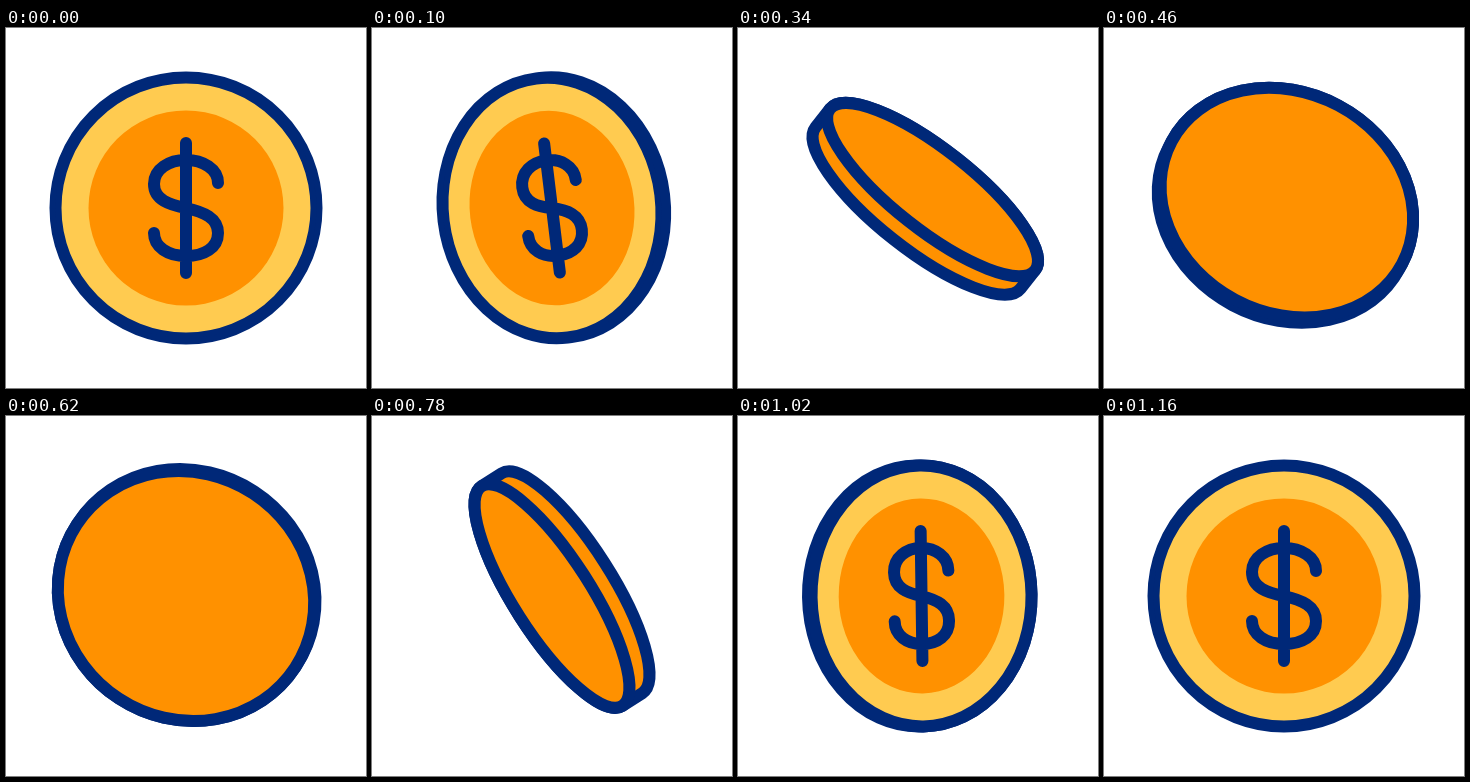
Animation of 360x360 px, one loop 1400 ms. Source, as an HTML page with a canvas:

```html
<!DOCTYPE html>
<html>
<head>
<meta charset="utf-8">
<style>
  html, body { margin: 0; width: 100%; height: 100%; overflow: hidden; background: #fff; }
  canvas { display: block; }
</style>
</head>
<body>
<canvas id="stage" width="360" height="360"></canvas>
<script>
const ctx = document.getElementById('stage').getContext('2d');
const NAVY = '#002878', ORANGE = '#ff9100', YELLOW = '#ffcb50';
const LOOP = 1400, HALF_TURN = 560, RADIUS = 130.5, LINE = 12;
const MAX_TILT = 62 * Math.PI / 180;

// Dollar sign, centred on the coin
const dollar = new Path2D(
  'M0-65V65 M32-25C32-39 17-48 0-48S-32-39-32-24C-32-8-16-3 0 0' +
  'C18 4 32 10 32 25S18 48 0 48S-32 39-32 25');

const ease = (t, start, length) => {
  const x = Math.min(1, Math.max(0, (t - start) / length));
  return (1 - Math.cos(Math.PI * x)) / 2;
};

function paint(path, fill, width) {
  if (fill) {
    ctx.fillStyle = fill;
    ctx.fill(path);
  }
  if (width) {
    ctx.lineWidth = width;
    ctx.stroke(path);
  }
}

function disc(x, rx, ry) {
  const path = new Path2D();
  path.ellipse(x, 0, Math.max(0, rx), ry, 0, 0, 2 * Math.PI);
  return path;
}

function draw(t) {
  const spin = Math.PI * Math.min(t / HALF_TURN, 2);
  const tilt = MAX_TILT * (ease(t, 0, 465) - ease(t, 520, 540));
  const turn = Math.cos(spin), squash = Math.abs(turn);
  // The outer edge is foreshortened, the line keeps its width
  const rx = Math.max(0, (RADIUS + LINE / 2) * squash - LINE / 2);
  const depth = Math.min(24, (32 - 10 * turn) * (1 - squash));
  const nearFace = spin % Math.PI < Math.PI / 2;
  const faceX = nearFace ? 0 : depth;

  ctx.setTransform(1, 0, 0, 1, 0, 0);
  ctx.fillStyle = '#fff';
  ctx.fillRect(0, 0, 360, 360);
  ctx.translate(180, 180);
  ctx.rotate(-tilt);
  ctx.strokeStyle = NAVY;
  ctx.lineCap = ctx.lineJoin = 'round';

  // Silhouette of both faces and the edge between them
  const body = new Path2D();
  body.ellipse(0, 0, rx, RADIUS, 0, Math.PI / 2, 1.5 * Math.PI);
  body.ellipse(depth, 0, rx, RADIUS, 0, -Math.PI / 2, Math.PI / 2);
  body.closePath();
  paint(body, ORANGE, LINE);

  if (turn < 0) {
    paint(disc(faceX, rx, RADIUS), ORANGE, LINE);
    return;
  }

  // The near face has a thinner line towards the edge
  const inset = nearFace ? 3 : 0;
  paint(disc(faceX, rx - inset, RADIUS - inset), YELLOW, LINE - 2 * inset);
  paint(disc(faceX, 97.5 * squash, 97.5), ORANGE);
  const sign = new Path2D();
  sign.addPath(dollar, new DOMMatrix([turn, 0, 0, 1, faceX, 0]));
  paint(sign, null, LINE);
}

const start = performance.now();
function tick() {
  draw((performance.now() - start) % LOOP);
  requestAnimationFrame(tick);
}
tick();
</script>
</body>
</html>
```
